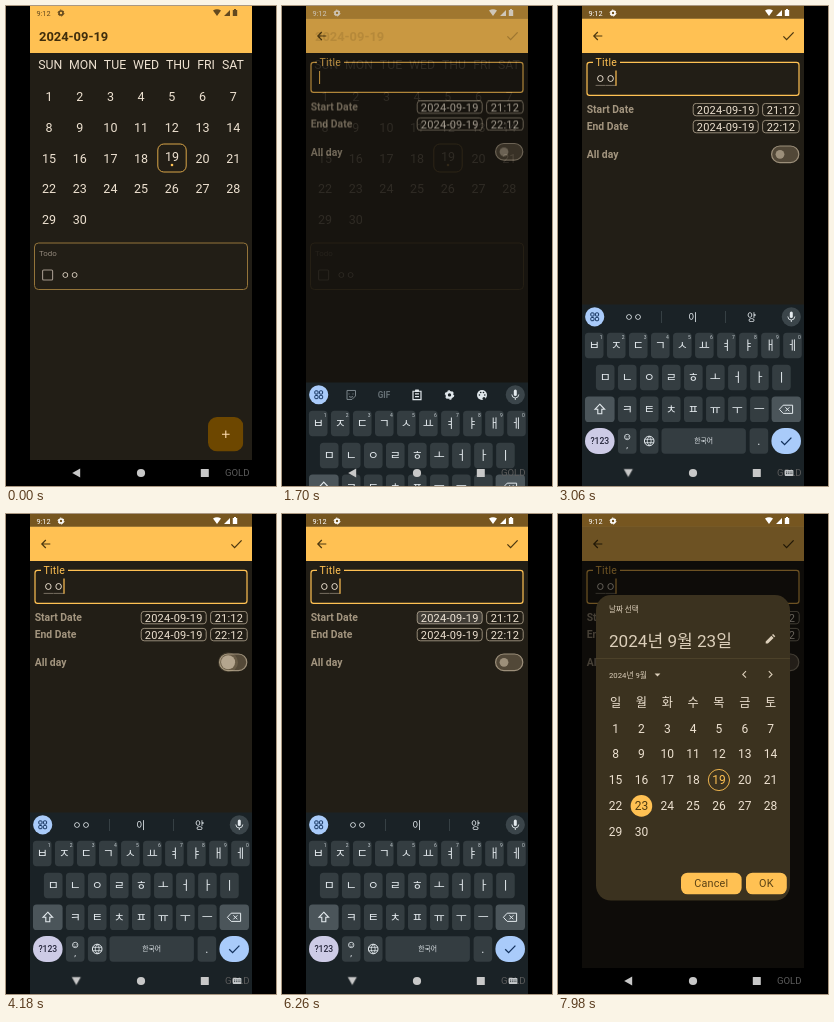
Recreate the animation shown at these times as an HTML page. Size 270x480 px, loop 8 s.

```html
<!DOCTYPE html>
<html lang="en">
<head>
<meta charset="utf-8">
<title>Calendar app</title>
<style>
html, body { margin: 0; width: 100%; height: 100%; overflow: hidden; background: #000; }
svg { display: block; width: 100vw; height: 100vh; }
text { font-family: Roboto, 'Noto Sans CJK KR', 'Noto Sans CJK JP', 'Noto Sans CJK', sans-serif; white-space: pre; }

/* One loop is 8 s, so 1% is 80 ms */
.a { animation: 8s linear infinite both; }
.step { animation-timing-function: step-end; }

/* Floating button opens into a menu */
.fabTap { animation-name: fabTap; }
@keyframes fabTap {
  0%, 6.2% { opacity: 0; r: 4px; }
  7% { opacity: .16; }
  9% { opacity: .16; r: 24px; }
  11.5%, 100% { opacity: 0; r: 24px; }
}
.grow { animation-name: grow; }
@keyframes grow {
  0%, 9% { x: 202px; y: 411px; width: 35.3px; height: 34.5px; animation-timing-function: cubic-bezier(.3, 0, .2, 1); }
  15.5%, 100% { x: 130px; y: 385px; width: 107.3px; height: 60.5px; }
}
.plus { animation-name: plus; }
@keyframes plus { 0%, 9% { opacity: 1; } 11%, 100% { opacity: 0; } }
.menu { animation-name: menu; }
@keyframes menu { 0%, 9.5% { opacity: 0; } 14%, 100% { opacity: 1; } }
.shade { animation-name: shade; }
@keyframes shade { 0%, 9% { opacity: 0; } 15%, 100% { opacity: .68; } }
.sheet { animation-name: sheet; }
@keyframes sheet { 0%, 9% { fill: #221e16; } 15%, 100% { fill: #000; } }
.menuTap { animation-name: menuTap; }
@keyframes menuTap {
  0%, 16.5% { opacity: 0; r: 8px; }
  17.2% { opacity: .16; }
  19.5% { opacity: .16; r: 70px; }
  22%, 100% { opacity: 0; r: 70px; }
}

/* Form */
.form { animation-name: form; }
@keyframes form { 0%, 18.5% { opacity: 0; } 22.5%, 100% { opacity: 1; } }
.field { animation-name: field; }
@keyframes field { 0% { height: 30px; } 35.75%, 100% { height: 33px; } }
.below { animation-name: below; }
@keyframes below { 0% { transform: translateY(-2.5px); } 35.75%, 100% { transform: none; } }
.check { animation-name: check; }
@keyframes check { 0% { opacity: .35; } 35.75%, 100% { opacity: 1; } }
.caret0 { animation-name: caret0; }
@keyframes caret0 { 0% { opacity: 1; } 27.25% { opacity: 0; } 33.25% { opacity: 1; } 35.75%, 100% { opacity: 0; } }
.caret { animation-name: caret; }
@keyframes caret {
  0% { opacity: 0; transform: translateX(-10.2px); }
  35.75% { opacity: 1; transform: translateX(-10.2px); }
  37.75% { opacity: 1; transform: none; }
  44.25% { opacity: 0; transform: none; } 50.25% { opacity: 1; }
  56.75% { opacity: 0; } 63% { opacity: 1; }
  68.75% { opacity: 0; } 73.75% { opacity: 1; }
  80% { opacity: 0; } 86.25% { opacity: 1; }
  92.75% { opacity: 0; } 99.25%, 100% { opacity: 1; transform: none; }
}
.ch1 { animation-name: ch1; }
@keyframes ch1 { 0% { opacity: 0; } 35.75%, 100% { opacity: 1; } }
.ch2 { animation-name: ch2; }
@keyframes ch2 { 0% { opacity: 0; } 37.75%, 100% { opacity: 1; } }

/* All-day switch folds the date rows away and back */
:root { --spring: linear(0, .264 10%, .594 20%, .801 30%, .908 40%, .96 50%, .983 60%, 1); }
.slide { animation-name: slide; }
.dates { animation-name: dates; }
@keyframes slide {
  0%, 52.625% { transform: none; animation-timing-function: var(--spring); }
  58.875%, 65.125% { transform: translateY(-31px); animation-timing-function: var(--spring); }
  71.375%, 100% { transform: none; }
}
@keyframes dates {
  0%, 52.625% { opacity: 1; animation-timing-function: var(--spring); }
  58.875%, 65.125% { opacity: 0; animation-timing-function: var(--spring); }
  71.375%, 100% { opacity: 1; }
}
.track { animation-name: track; }
@keyframes track {
  0%, 52.25% { fill: #524838; stroke: #9c8f7a; }
  53.5%, 64.5% { fill: #ffc153; stroke: #ffc153; }
  65.75%, 100% { fill: #524838; stroke: #9c8f7a; }
}
.thumb { animation-name: thumb; }
@keyframes thumb {
  0%, 49.75% { cx: 222px; r: 4.4px; fill: #9c8f7a; }
  51%, 52.25% { cx: 222px; r: 7px; fill: #b5a68f; }
  53.5% { cx: 232.7px; r: 7px; fill: #5b4000; }
  55%, 62.25% { cx: 232.7px; r: 6.4px; fill: #5b4000; }
  63.5%, 64.5% { cx: 232.7px; r: 7px; fill: #5b4000; }
  65.75% { cx: 222.4px; r: 5px; fill: #a89b85; }
  66.5%, 100% { cx: 222px; r: 4.4px; fill: #9c8f7a; }
}
.halo { animation-name: halo; }
@keyframes halo {
  0%, 49.75% { opacity: 0; cx: 222px; }
  51%, 52.5% { opacity: .12; cx: 222px; }
  53.5% { opacity: .12; cx: 232.7px; }
  57%, 62.25% { opacity: 0; cx: 232.7px; }
  63.5%, 64.5% { opacity: .12; cx: 232.7px; }
  65.75% { opacity: .12; cx: 222.4px; }
  70%, 100% { opacity: 0; cx: 222px; }
}

/* Keyboard and navigation bar */
.board { animation-name: board; }
@keyframes board {
  0%, 20% { transform: translateY(183px); animation-timing-function: cubic-bezier(0, 0, .2, 1); }
  25.1%, 78.5% { transform: none; animation-timing-function: cubic-bezier(.4, 0, 1, 1); }
  80.5%, 100% { transform: translateY(183px); }
}
.tools { animation-name: tools; }
@keyframes tools { 0% { opacity: 1; } 36.25%, 100% { opacity: 0; } }
.words { animation-name: words; }
@keyframes words { 0% { opacity: 0; } 36.25%, 100% { opacity: 1; } }
.press { animation-name: press; }
@keyframes press { 0% { opacity: 0; } 35.25% { opacity: 1; } 36.25% { opacity: 0; } 37.25% { opacity: 1; } 38%, 100% { opacity: 0; } }
.back { animation-name: back; transform-origin: 70.3px 467px; }
@keyframes back {
  0%, 22% { transform: none; }
  24.75%, 78.75% { transform: rotate(-90deg); }
  81.25%, 100% { transform: none; }
}
.ime { animation-name: ime; }
@keyframes ime { 0% { opacity: 0; } 22.5% { opacity: 1; } 79.5%, 100% { opacity: 0; } }

/* Date picker */
.pillTap { animation-name: pillTap; }
@keyframes pillTap { 0%, 77.6% { opacity: 0; } 78.5%, 79% { opacity: .2; } 81%, 100% { opacity: 0; } }
.dim { animation-name: dim; }
@keyframes dim { 0%, 79% { opacity: 0; } 80.5%, 100% { opacity: .57; } }
.picker { animation-name: picker; }
@keyframes picker {
  0%, 79% { opacity: 0; transform: translateY(-60px); }
  80.25% { opacity: 1; }
  82%, 100% { opacity: 1; transform: none; }
}
.picker { animation-timing-function: ease-out; }
.none { animation-name: none0; }
@keyframes none0 { 0% { opacity: 1; } 95%, 100% { opacity: 0; } }
.chosen { animation-name: chosen; }
@keyframes chosen { 0% { opacity: 0; } 95%, 100% { opacity: 1; } }
.disc { animation-name: disc; }
@keyframes disc { 0%, 94.8% { opacity: 0; } 96.2%, 100% { opacity: 1; } }
.dayTap { animation-name: dayTap; }
@keyframes dayTap {
  0%, 93.2% { opacity: 0; r: 3px; }
  94% { opacity: .16; }
  95.5% { opacity: .16; r: 10.8px; }
  98.5%, 100% { opacity: 0; r: 10.8px; }
}
</style>
</head>
<body>
<svg id="stage" viewBox="0 0 270 480" preserveAspectRatio="none"></svg>
<script>
const gold = '#ffc153', cream = '#ede1d0', page = '#221e16', ink = '#4d3810';
const range = n => [...Array(n).keys()];

// Text placed by the middle of its capitals
const text = (x, y, s, size, fill, anchor = 'middle', more = '') =>
  `<text x="${x}" y="${(y + size * .36).toFixed(2)}" font-size="${size}" fill="${fill}" text-anchor="${anchor}" ${more}>${s}</text>`;
const box = (x, y, w, h, r, fill, more = '') =>
  `<rect x="${x}" y="${y}" width="${w}" height="${h}" rx="${r}" fill="${fill}" ${more}/>`;
const dot = (x, y, r, fill, more = '') =>
  `<circle cx="${x}" cy="${y}" r="${r}" fill="${fill}" ${more}/>`;
const line = (d, color, w = 1, more = '') =>
  `<path d="${d}" fill="none" stroke="${color}" stroke-width="${w}" ${more}/>`;
const gear = (x, y, r, c) =>
  dot(x, y, r * .62, 'none', `stroke="${c}" stroke-width="${r * .5}"`) +
  dot(x, y, r * .9, 'none', `stroke="${c}" stroke-width="${r * .3}" stroke-dasharray="${r * .47}"`);

// September 2024 starts on a Sunday
const month = (x0, y0, dx, dy, size, skip) => range(30).filter(i => i + 1 !== skip).map(i =>
  text((x0 + i % 7 * dx).toFixed(2), y0 + Math.floor(i / 7) * dy, i + 1, size, cream)).join('');

const status = (bg, c) => box(24, 0, 222, 12.6, 0, bg) +
  text(30.5, 7, '9:12', 7.3, c, 'start') + gear(55, 7, 3.3, c) +
  `<path d="M207 4.6Q211 1.8 215 4.6L211 10ZM218 10L224 4V10ZM226.8 4H228V3H230V4H231.2V10H226.8Z" fill="${c}"/>`;

const names = [['SUN', 44.2], ['MON', 77], ['TUE', 109], ['WED', 140], ['THU', 172], ['FRI', 200], ['SAT', 227]];
const home = box(24, 0, 222, 454, 0, page, 'class="a sheet"') + status(gold, '#63491f') +
  box(24, 12, 222, 35, 0, gold) +
  text(33, 30, '2024-09-19', 12.9, '#3f2d0c', 'start', 'font-weight="700"') +
  names.map(([s, x]) => text(x, 58.5, s, 12.3, cream)).join('') +
  month(43, 90.5, 30.7, 30.8, 12.5, 19) +
  box(151.8, 138, 28.4, 28, 6, 'none', 'stroke="#d9a548"') +
  text(166, 150.5, '19', 12.5, cream) + dot(166, 159, 1.3, gold) +
  box(28.5, 237, 213, 46.5, 4, 'none', 'stroke="#94743a"') +
  text(33, 247.3, 'Todo', 7.9, '#91877a', 'start') +
  box(36.6, 264, 10, 10, 1, 'none', 'stroke="#a1968a" stroke-width="1.1"') +
  text(54.8, 269, 'ㅇㅇ', 10, cream, 'start') +
  box(24, 12.6, 222, 441.4, 0, '#000', 'class="a shade"');

const menu = `<clipPath id="fab"><rect class="a grow" rx="9"/></clipPath><g clip-path="url(#fab)">` +
  box(130, 385, 107.3, 60.5, 0, '#6d4700') +
  `<g class="a plus">${line('M216 428.3H223.6M219.8 424.5V432.1', '#ffddb0', 1.1)}</g><g class="a menu">` +
  box(130, 385, 107.3, 30, 0, '#3e532d') +
  line('M140.6 396.4H149.4V405H140.6ZM140.6 397.4H149.4M142.7 394.3V396M147.3 394.3V396', '#e5ead6', 1.3) +
  text(190, 400, 'Schedule', 9, '#e9eddc', 'middle', 'letter-spacing=".15"') +
  box(143, 425, 8, 8, 1, '#ffe2bb') + line('M141.6 427V434.6H149.4', '#ffe2bb', 1.1) +
  line('M144.8 429L146.6 430.8L149.7 427', '#6d4700', 1.1) +
  text(189, 430, 'Todo', 8.8, '#ffe2bb') + '</g>' +
  dot(219.8, 428.3, 4, '#fff', 'class="a fabTap"') +
  `<clipPath id="top">${box(130, 385, 107.3, 30, 0, '#000')}</clipPath>` +
  `<g clip-path="url(#top)">${dot(186, 400, 8, '#fff', 'class="a menuTap"')}</g></g>`;

const dateRow = (y, label, time) =>
  text(28.7, y, label, 10.4, '#a3957f', 'start', 'font-weight="700"') +
  [[135.2, 65, '2024-09-19'], [204.6, 36.6, time]].map(([x, w, s]) =>
    box(x, y - 6.2, w, 12.4, 3, 'none', 'stroke="#a39783" stroke-width=".9"') +
    text(x + w / 2, y + .1, s, 11, cream, 'middle', 'letter-spacing=".22"')).join('');

const typed = (x, c) => `<g class="a step ${c}">` + text(x, 72.5, 'ㅇ', 11.1, cream, 'start') +
  line(`M${x + .4} 79.4H${x + 10.4}`, '#8d8374', .8) + '</g>';

const form = `<g class="a form">` + box(24, 0, 222, 454, 0, page) + status('#765620', '#fff') +
  box(24, 12.6, 222, 34.4, 0, gold) +
  line('M44.3 30H36M39.8 26L35.8 30L39.8 34', ink, 1.2) +
  `<g class="a step check">${line('M225.4 30.4L228.6 33.6L235.6 26.4', ink, 1.3)}</g>` +
  box(29, 56.3, 212, 33, 2.6, 'none', `class="a step field" stroke="${gold}" stroke-width="1.2"`) +
  box(35, 54, 27, 5, 0, page) +
  text(37.6, 56.3, 'Title', 10.5, gold, 'start', 'letter-spacing=".2"') +
  box(37, 65, 1.1, 13, 0, gold, 'class="a step caret0"') +
  typed(37.2, 'ch1') + typed(47.4, 'ch2') +
  box(57.4, 64.5, 1.2, 15.3, 0, gold, 'class="a step caret"') +
  `<clipPath id="rows">${box(24, 97, 222, 70, 0, '#000')}</clipPath><g class="a step below">` +
  `<g clip-path="url(#rows)"><g class="a slide"><g class="a dates">` +
  dateRow(103.6, 'Start Date', '21:12') + dateRow(120.6, 'End Date', '22:12') +
  box(135.2, 97.4, 65, 12.4, 3, '#fff', 'class="a pillTap"') + '</g></g></g>' +
  `<g class="a slide">` + text(28.7, 148.3, 'All day', 10.4, '#a3957f', 'start', 'font-weight="700"') +
  box(213.6, 140, 27.2, 16.6, 8.3, '#524838', 'class="a track" stroke-width="1.2"') +
  dot(222, 148.3, 10, '#ffe3b5', 'class="a halo"') + dot(222, 148.3, 4.4, '#9c8f7a', 'class="a thumb"') +
  '</g></g></g>';

// Keyboard
const keyBg = '#343d41', keyInk = '#e4eaee', blue = '#a9cbfa';
const key = (x, y, s, w = 18.6, size = 12) => box(x - w / 2, y - 12.7, w, 25.4, 3.6, keyBg) + text(x, y, s, size, keyInk);
const keys = (x0, y, s) => [...s].map((c, i) => key(x0 + i * 22.03, y, c)).join('');
const tools =
  line('M65 306.5H73.5V312L70 315.5H65ZM67 309.5V310.5M71 309.5V310.5M67 312.6Q69 314 71 312.6', '#7b858a', 1) +
  text(102, 311, 'GIF', 8.2, '#667075', 'middle', 'font-weight="700"') +
  line('M131 307.3H139V315.6H131ZM133 310H137M133 312.7H137', '#dfe6ea', 1.2) + box(133, 305.6, 4, 2.4, .6, '#dfe6ea') +
  gear(167.5, 311, 4.5, '#dfe6ea') +
  dot(200, 311, 5, '#dfe6ea') + [[197.4, 311], [198.7, 308.5], [201.5, 308.5], [202.8, 311]].map(p => dot(...p, .8, '#1a2226')).join('') +
  dot(202, 314.5, 1.5, '#1a2226');
const words = ['ch1', 'ch2'].map((c, i) => `<g class="a step ${c}">${text(66.4 + i * 9, 311, 'ㅇ', 9.8, keyInk, 'start')}</g>`).join('') +
  text(134.7, 311, '이', 9.8, keyInk) + text(193.5, 311, '양', 9.8, keyInk) +
  line('M103.5 305V317M167.5 305V317', '#3a4448', .9);
const board = `<g class="a board">` + box(24, 298.5, 222, 183, 0, '#1a2226') +
  dot(36.7, 310.8, 9.6, blue) +
  range(4).map(i => box(32.8 + i % 2 * 4.6, 306.9 + (i >> 1) * 4.6, 3.2, 3.2, .8, 'none', 'stroke="#12315c"')).join('') +
  dot(233.3, 310.8, 9.6, '#3b454a') + box(231.8, 305.6, 3, 6.4, 1.5, keyInk) +
  line('M229.8 310.5Q230 314 233.3 314Q236.6 314 236.8 310.5M233.3 314V316', keyInk, .9) +
  `<g class="a step tools">${tools}</g><g class="a step words">${words}</g>` +
  keys(36.2, 339.5, 'ㅂㅈㄷㄱㅅㅛㅕㅑㅐㅔ') +
  range(10).map(i => text(36.2 + i * 22.03 + 7, 331.4, (i + 1) % 10, 5, '#c3cbcf')).join('') +
  keys(47.2, 371.5, 'ㅁㄴㅇㄹㅎㅗㅓㅏㅣ') +
  `<g class="a step press">${box(81.96, 358.8, 18.6, 25.4, 3.6, '#5d686d')}${text(91.26, 371.5, 'ㅇ', 12, keyInk)}</g>` +
  keys(69.2, 403.3, 'ㅋㅌㅊㅍㅠㅜㅡ') +
  box(27, 390.6, 29.6, 25.4, 3.6, '#4b555a') +
  line('M41.8 398.2L46.6 403.3H43.8V407.8H39.8V403.3H37Z', keyInk, 1.1) +
  box(213.6, 390.6, 29.4, 25.4, 3.6, '#4b555a') +
  line('M225.2 399.2H234.6V407.4H225.2L221.4 403.3ZM227.4 401.3L231.4 405.3M231.4 401.3L227.4 405.3', keyInk, 1) +
  box(27, 422, 29.6, 26, 13, '#cdcbe6') + text(41.8, 435, '?123', 8.6, '#25263b', 'middle', 'font-weight="500"') +
  key(69.2, 435, '') + dot(69.2, 431, 2.7, 'none', `stroke="${keyInk}" stroke-width=".8"`) +
  line('M68 430V430.8M70.4 430V430.8M67.8 432Q69.2 433 70.6 432', keyInk, .6) + text(69.2, 439, ',', 9, keyInk) +
  key(91.2, 435, '') + dot(91.2, 435, 4.8, 'none', `stroke="${keyInk}" stroke-width="1"`) +
  line('M86.6 433.3H95.8M86.6 436.7H95.8M91.2 430.2Q87.2 435 91.2 439.8Q95.2 435 91.2 430.2', keyInk, .8) +
  key(145.7, 435, '한국어', 84.4, 6.8) + key(200.9, 435, '.') +
  box(213.4, 422, 29.6, 26, 13, blue) + line('M223.2 435.2L226.6 438.6L233.4 431.6', '#12315c', 1.3) + '</g>';

const navInk = '#c8c8c8';
const nav = `<path class="a back" d="M66.2 467L74.2 462.5V471.5Z" fill="${navInk}"/>` +
  dot(135, 467, 4.1, navInk) + box(194.8, 463, 8, 8, .5, navInk) +
  text(231.3, 467, 'GOLD', 9.6, '#5c5c5c') +
  `<g class="a step ime">` + box(226.8, 464, 8.6, 6, .8, '#c4c8ca') +
  line('M228 466H234.4M228 467.6H234.4', '#1a2226', .8, 'stroke-dasharray="1 .8"') + '</g>';

// Date picker
const muted = '#dccfba', col = i => (57.6 + i * 25.83).toFixed(2);
const button = (x, w, s) => box(x, 358.7, w, 21.6, 6.5, gold) +
  text(x + w / 2, 369.6, s, 10.8, '#5a4214', 'middle', 'letter-spacing=".2"');
const picker = box(24, 12.6, 222, 441.4, 0, '#000', 'class="a dim"') + `<g class="a picker">` +
  box(38, 81, 194, 305.6, 15, '#3b321f') +
  text(51, 95.3, '날짜 선택', 7.6, muted, 'start') +
  `<g class="a step none">${text(51, 126.5, '선택한 날짜', 17.1, muted, 'start')}</g>` +
  `<g class="a step chosen">${text(51, 126.5, '2024년 9월 23일', 17.1, muted, 'start')}</g>` +
  `<path d="M207.7 129.6V127.4L213.4 121.7L215.6 123.9L209.9 129.6ZM214 121.1L215.1 120L217.3 122.2L216.2 123.3Z" fill="${muted}"/>` +
  line('M38 144.5H232', '#55482f', .7) +
  text(51, 160.8, '2024년 9월', 7.75, muted, 'start') +
  `<path d="M96.6 159.4H102.4L99.5 162.4Z" fill="${muted}"/>` +
  line('M188 157.2L184.8 160.4L188 163.6M210.8 157.2L214 160.4L210.8 163.6', muted, 1.1) +
  [...'일월화수목금토'].map((c, i) => text(col(i), 189, c, 12.2, cream)).join('') +
  month(57.6, 214.2, 25.83, 25.9, 12, 19) +
  dot(col(4), 266, 10.6, 'none', `stroke="${gold}" stroke-width=".9"`) + text(col(4), 266, '19', 12, gold) +
  `<g class="a disc">${dot(col(1), 291.9, 10.8, gold)}${text(col(1), 291.9, '23', 12, '#4f3a10')}</g>` +
  dot(col(1), 291.9, 3, '#fff', 'class="a dayTap"') +
  button(123, 60.6, 'Cancel') + button(188, 40.8, 'OK') + '</g>';

document.getElementById('stage').innerHTML =
  box(0, 0, 270, 480, 0, '#000') + home + menu + form + board + picker + nav;
</script>
</body>
</html>
```
